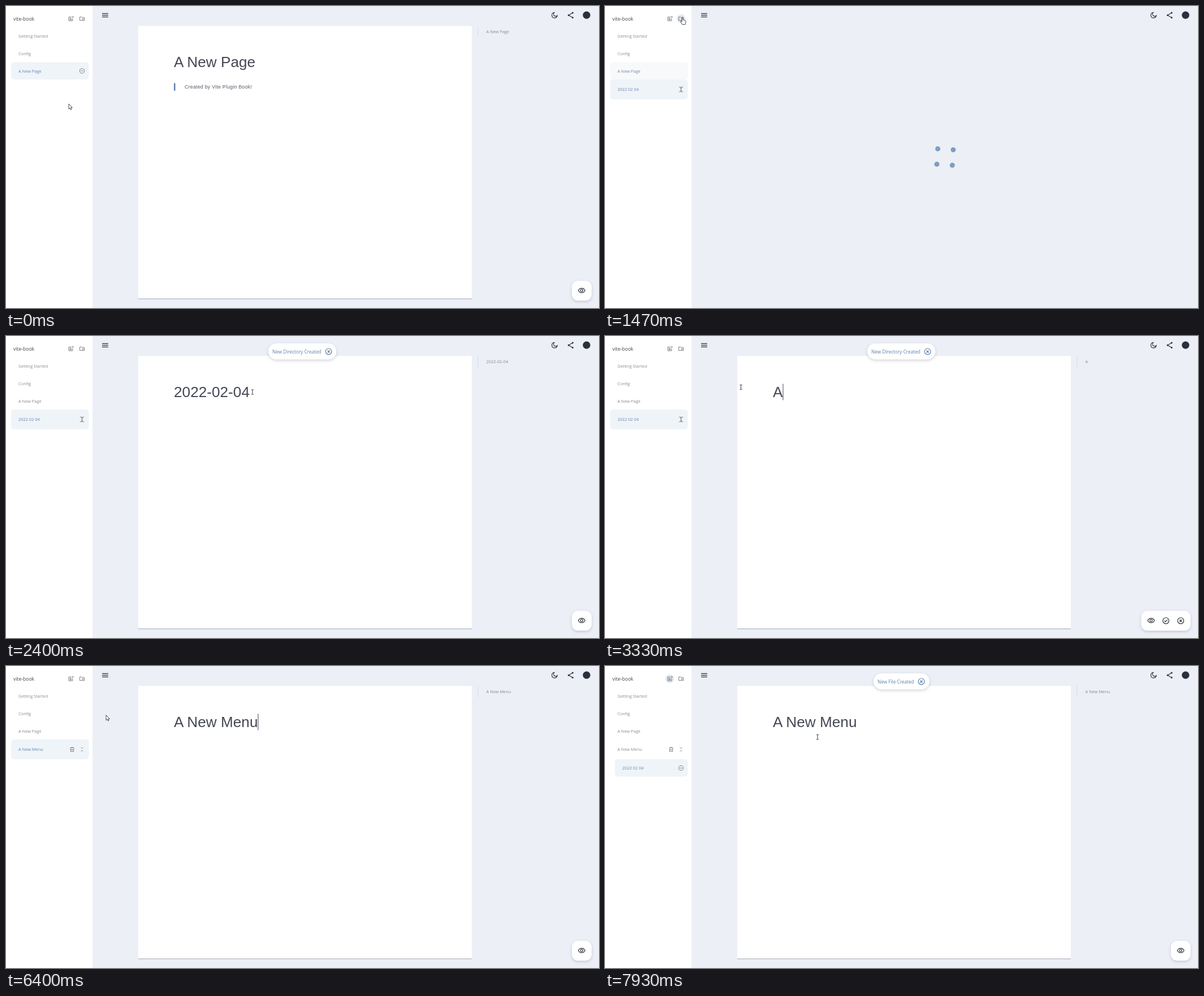
Animation, 1049 px wide and 534 px high, one loop 8 s. Source, as an HTML page:

```html
<!DOCTYPE html>
<html lang="en">
<head>
<meta charset="utf-8">
<title>vite-book</title>
<style>
html, body { margin: 0; width: 100%; height: 100%; overflow: hidden; background: #eceff6; }
svg { display: block; }
text { font-family: "Open Sans", "Noto Sans", sans-serif; font-size: 7.4px; fill: #8b8b92; white-space: pre; }
.page text { font-family: "Liberation Sans", Arial, sans-serif; }
.icon { fill: none; stroke: #2b303c; stroke-width: 2; }
.side .icon { stroke: #6c6c72; stroke-width: 1.9; }
.row { fill: #eff4f8; }
.pill { fill: #fff; filter: drop-shadow(0 2px 2.5px rgba(50, 60, 90, .22)); }
.paper { fill: #fff; filter: drop-shadow(0 1px .7px rgba(50, 60, 80, .42)); }
.toast text { font-size: 8.26px; fill: #5e81ac; }
.toast .icon { stroke: #5e81ac; }
#cursor path { fill: #fff; stroke: #222; stroke-width: .8; stroke-linejoin: round; }
#cursor #beam { fill: none; stroke: #333; stroke-width: 1; }
</style>
</head>
<body>
<svg id="stage" width="1049" height="534" viewBox="0 0 1049 534">
  <rect width="1049" height="534" fill="#eceff6"/>

  <g class="side">
    <rect width="153" height="534" fill="#fff"/>
    <text x="13" y="25.7" style="font-size:8.55px;fill:#42454f">vite-book</text>
    <circle id="noteHover" cx="114.6" cy="22.5" r="7.8" fill="#e4e9f0"/>
    <circle id="folderHover" cx="134.6" cy="22.5" r="7.8" fill="#e4e9f0"/>
    <g data-icon="note" data-at="114.6 22.5 .45"></g>
    <g data-icon="folder" data-at="134.6 22.5 .45"></g>
    <text x="22" y="56.4">Getting Started</text>
    <text x="22" y="87">Config</text>
    <rect id="pageRow" class="row" x="9" y="99.5" width="137.5" height="30.5" rx="5"/>
    <text id="pageName" x="22" y="117.6">A New Page</text>
    <g id="pageMinus" data-icon="minus" data-at="134.5 114.8 .45"></g>
    <g id="menu">
      <rect id="menuRow" class="row" x="9" y="130" width="137.5" height="35" rx="5"/>
      <text id="menuName" x="22" y="150.3"></text>
      <g id="expand" data-icon="expand" data-at="134.5 147.5 .45"></g>
      <g id="collapse">
        <g data-icon="trash" data-at="117 147.5 .45"></g>
        <g data-icon="collapse" data-at="134.5 147.5 .45"></g>
      </g>
    </g>
    <g id="child">
      <rect class="row" x="17.5" y="165" width="129" height="30.5" rx="5"/>
      <text x="30.5" y="183" style="fill:#6485b0">2022 02 04</text>
      <g data-icon="minus" data-at="134.5 180.4 .45"></g>
    </g>
  </g>

  <g data-icon="menu" data-at="175.4 16.3 .6"></g>
  <g data-icon="moon" data-at="970.4 16.3 .6"></g>
  <g data-icon="share" data-at="998.8 16.3 .6"></g>
  <circle cx="1027" cy="16.2" r="6.6" fill="#2b303c"/>

  <g id="loader" fill="#7f9dc2">
    <circle cx="587.8" cy="253.3" r="4.5"/><circle cx="615.2" cy="253.3" r="4.5"/>
    <circle cx="615.2" cy="280.7" r="4.5"/><circle cx="587.8" cy="280.7" r="4.5"/>
  </g>

  <g id="content">
    <g class="page">
      <rect class="paper" x="234" y="35.3" width="590" height="482"/>
      <rect id="selection" y="84.5" height="29.5" fill="#c6d3e3"/>
      <text id="title" xml:space="preserve" x="297" y="108" style="font-size:26.2px;fill:#454854"></text>
      <rect id="caret" y="84.5" width="1" height="29" fill="#454854"/>
      <g id="quote">
        <rect x="297" y="136.5" width="2.5" height="13.3" fill="#5e81ac"/>
        <text x="316" y="146" style="font-size:8.74px;letter-spacing:.273px;fill:#555a66">Created by Vite Plugin Book!</text>
      </g>
    </g>
    <rect x="834.6" y="35.5" width=".8" height="20" fill="#d3d8e2"/>
    <text id="toc" x="849.6" y="47.7"></text>
    <g id="closedFab">
      <rect class="pill" x="1001" y="486" width="35" height="35" rx="11"/>
    </g>
    <g id="openFab">
      <rect class="pill" x="948.5" y="486" width="87.5" height="35" rx="11"/>
      <g data-icon="eye" data-at="966 503.4 .6"></g>
      <g data-icon="check" data-at="992.2 503.4 .6"></g>
      <g data-icon="cancel" data-at="1018.4 503.4 .6"></g>
    </g>
    <g id="closedEye" data-icon="eye" data-at="1018.4 503.4 .6"></g>
  </g>

  <g id="dirToast" class="toast">
    <rect class="pill" x="464" y="13" width="120.5" height="28.5" rx="14.2"/>
    <text x="471" y="31">New Directory Created</text>
    <g data-icon="cancel" data-at="570.7 27.4 .6"></g>
  </g>
  <g id="fileToast" class="toast">
    <rect class="pill" x="475" y="13" width="99" height="28.5" rx="14.2"/>
    <text x="482" y="31">New File Created</text>
    <g data-icon="cancel" data-at="559.6 27.4 .6"></g>
  </g>

  <g id="cursor">
    <path id="arrow" d="M0 0V9.2L2.1 7.3 3.5 10.4 5 9.7 3.7 6.7H6.3Z"/>
    <path id="hand" d="M-1 1Q0-.6 1 1V5L5 6.2Q6.3 6.6 6 8.5L5 13H-.5L-3.2 8.5Q-3.4 7-2 7.2L-1 8.3Z"/>
    <path id="beam" d="M-2-4.3Q0-4.3 0-3.4Q0-4.3 2-4.3M0-3.4V3.4M-2 4.3Q0 4.3 0 3.4Q0 4.3 2 4.3"/>
  </g>
</svg>
<script>
const DURATION = 8000, STEP = 1000 / 15;
const $ = id => document.getElementById(id);

const ring = "M12 3a9 9 0 0 1 0 18a9 9 0 0 1 0-18";
const icons = {
  menu: "M3 7h18M3 12h18M3 17h18",
  moon: "M10.9 4A8 8 0 1 0 20 13.1A6.4 6.4 0 0 1 10.9 4Z",
  share: "M18 5L6 12L18 19M18 3.5a1.5 1.5 0 0 1 0 3a1.5 1.5 0 0 1 0-3M6 10.5a1.5 1.5 0 0 1 0 3a1.5 1.5 0 0 1 0-3M18 17.5a1.5 1.5 0 0 1 0 3a1.5 1.5 0 0 1 0-3",
  eye: "M2.1 11.5Q5 5 12 5T21.9 11.5Q19 18 12 18T2.1 11.5ZM12 8a3.5 3.5 0 0 1 0 7a3.5 3.5 0 0 1 0-7",
  check: ring + "M7.5 12.2l3 3 6-6.2",
  cancel: ring + "M8.5 8.5l7 7m0-7l-7 7",
  minus: ring + "M7.5 12h9",
  folder: "M3 5v14h18V7h-9.5l-2-2zM12 13.5h6M15 10.5v6",
  note: "M15 5H4v15h15V10M7.5 10h6M7.5 13h8M7.5 16h8M20 2v6M17 5h6",
  expand: "M4 3h16M4 21h16M12 5v14M8.5 9l3.5-3.5L15.500 9M8.500 15l3.500 3.500L15.500 15",
  collapse: "M8 4.500l4 4 4-4M8 19.500l4-4 4 4",
  trash: "M6 7v13h12V7M4.500 5.500h15M9 4h6M10 11v5M14 11v5"
};
for (const g of document.querySelectorAll("[data-icon]")) {
  const [x, y, scale] = g.dataset.at.split(" ");
  g.setAttribute("transform", `translate(${x} ${y}) scale(${scale}) translate(-12 -12)`);
  g.innerHTML = `<path class="icon" d="${icons[g.dataset.icon]}"/>`;
}

const titles = [
  [0, "A New Page"], [1600, "2022-02-04"], [3330, "A"], [3600, "A "], [3870, "A N"],
  [4000, "A Ne"], [4130, "A New"], [4270, "A New "], [5130, "A New M"], [5400, "A New Me"],
  [5530, "A New Men"], [5670, "A New Menu"], [7070, "2022-02-04"], [7930, "A New Menu"]
];
// time, hotspot x, y, shape
const pointer = [
  [0, 111, 173, "arrow"], [200, 66, 163, "arrow"], [390, 66, 163, "arrow"],
  [400, 80, 159, "arrow"], [535, 80, 159, "arrow"], [870, 112, 84, "arrow"],
  [1060, 137, 24, "hand"], [1130, 140, 19.500, "hand"], [1260, 140, 19.500, "hand"],
  [1270, 137, 19.500, "hand"], [1870, 137, 19.500, "hand"], [1935, 172, 25, "arrow"],
  [2130, 400, 48, "beam"], [2270, 487, 56, "beam"], [2400, 436, 99, "beam"],
  [2800, 243, 92, "beam"], [2990, 243, 92, "beam"], [3000, 240.500, 90.500, "beam"],
  [6200, 240.500, 90.500, "beam"], [6270, 222, 89, "arrow"], [6400, 177, 86.800, "arrow"],
  [6670, 116, 20, "hand"], [7130, 116, 20, "hand"], [7270, 150, 34, "arrow"],
  [7470, 250, 78, "beam"], [7870, 376, 125.500, "beam"], [DURATION, 376, 125.500, "beam"]
];

const ramp = (t, a, b) => Math.min(1, Math.max(0, (t - a) / (b - a)));
const mix = k => `rgb(${[[139, 100], [139, 133], [146, 176]].map(([a, b]) => a + (b - a) * k)})`;
const show = (id, on) => { $(id).style.display = on ? "" : "none"; };
const last = (table, t) => table.reduce((found, row) => row[0] <= t ? row : found);

function movePointer(t) {
  const from = last(pointer, t);
  const to = pointer[pointer.indexOf(from) + 1] || from;
  const k = to === from ? 0 : ramp(t, from[0], to[0]);
  const x = from[1] + (to[1] - from[1]) * k, y = from[2] + (to[2] - from[2]) * k;
  $("cursor").setAttribute("transform", `translate(${x} ${y})`);
  for (const shape of ["arrow", "hand", "beam"]) show(shape, shape === from[3]);
  return x;
}

function placeToast(id, t, start, end) {
  show(id, t >= start && t < end + 200);
  const y = -42 * (1 - ramp(t, start - 30, start + 170) + ramp(t, end - 65, end + 135));
  $(id).setAttribute("transform", `translate(0 ${y})`);
}

function render(t) {
  const created = t >= 1470, loading = created && t < 1600;
  const saved = t >= 6270, nested = t >= 6870, editing = t >= 3330 && !saved;

  const pageActive = created ? 1 - ramp(t, 1270, 1670) : 1;
  $("pageRow").style.opacity = pageActive;
  $("pageName").style.fill = mix(pageActive);
  show("pageMinus", !created);

  const menuActive = 1 - ramp(t, 6935, 7200);
  show("menu", created);
  $("menuRow").style.opacity = menuActive;
  $("menuName").style.fill = mix(menuActive);
  $("menuName").textContent = saved ? "A New Menu" : "2022 02 04";
  show("expand", !saved);
  show("collapse", saved);
  show("child", nested);
  show("folderHover", t >= 1060 && t < 1930);
  show("noteHover", t >= 6600 && t < 7270 || t >= 7930);

  show("loader", loading);
  $("loader").setAttribute("transform", `rotate(${3.500 + (t - 1470) * .3} 601.500 267)`);
  show("content", !loading);
  show("quote", !created);
  show("openFab", editing);
  show("closedFab", !editing);
  show("closedEye", !editing);

  const text = last(titles, t)[1];
  $("title").textContent = text;
  $("toc").textContent = text.trim();
  const end = 297 + $("title").getComputedTextLength();
  $("caret").setAttribute("x", end);
  show("caret", t >= 3330 && t < 6800 && !(t >= 4800 && t < 5130));

  const x = movePointer(t);
  const left = Math.min(end, Math.max(297, x));
  show("selection", t >= 2400 && t < 3330);
  $("selection").setAttribute("x", left);
  $("selection").setAttribute("width", end - left);

  placeToast("dirToast", t, 1600, 3470);
  placeToast("fileToast", t, 6830, 9000);
}

const origin = performance.now();
function tick() {
  const now = (performance.now() - origin) % DURATION;
  // The screen updates 15 times a second, on times rounded to 10 ms.
  render(Math.round(Math.floor((now + 4) / STEP) * STEP / 10) * 10);
  requestAnimationFrame(tick);
}
tick();
</script>
</body>
</html>
```
